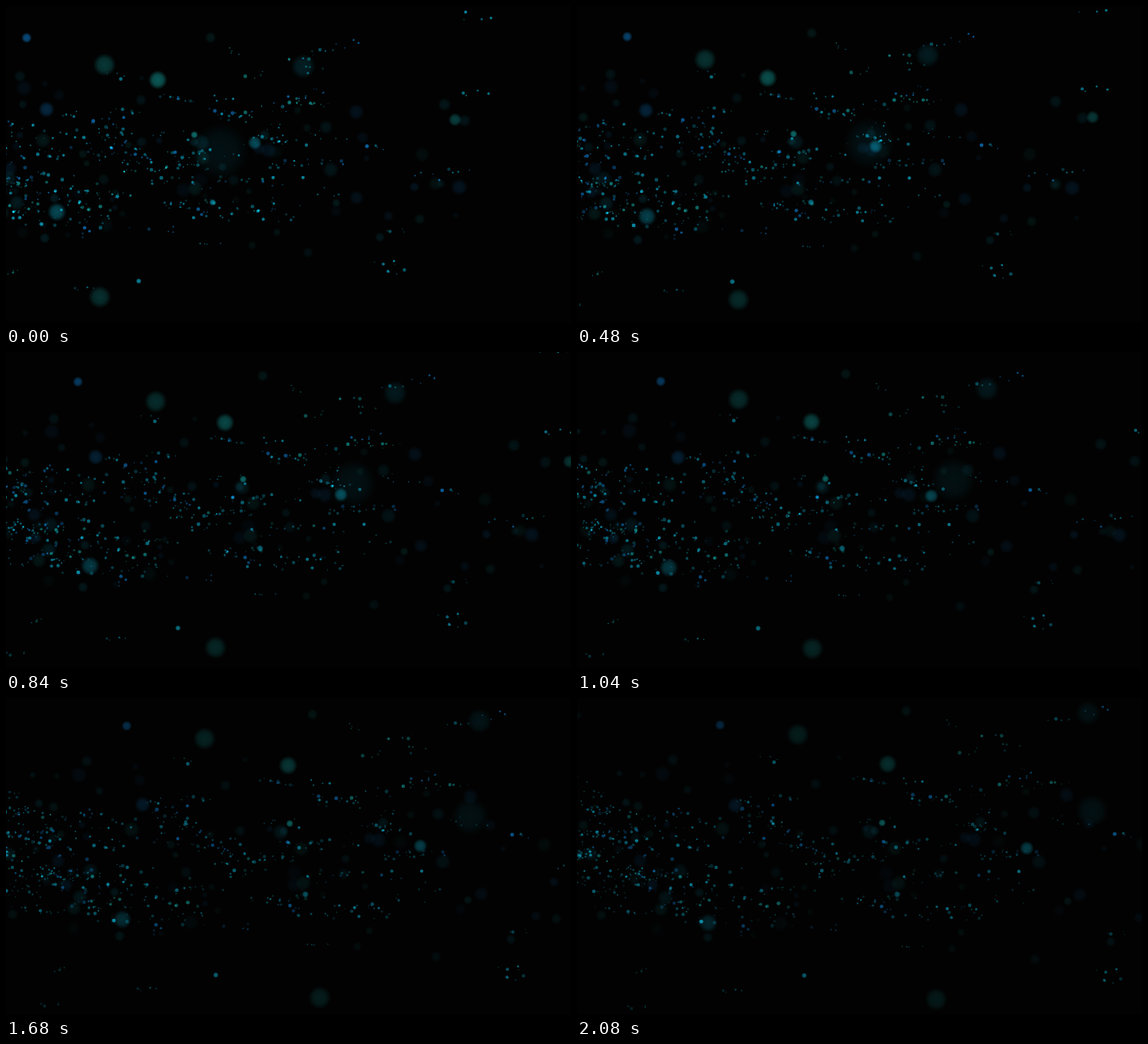
These frames come from a looping animation (711x400 px, 2.12 s). An HTML page with a canvas:

```html
<!DOCTYPE html>
<html lang="en">
<head>
<meta charset="utf-8">
<title>Drifting particles</title>
<style>
html, body { margin: 0; width: 100%; height: 100%; overflow: hidden; background: #000; }
canvas { display: block; }
</style>
</head>
<body>
<canvas width="711" height="400"></canvas>
<script>
const ctx = document.querySelector('canvas').getContext('2d');
const LOOP = 2120, STEP = 40, SPAN = 2080;
const TEAL = '14,135,132', CYAN = '8,145,172', BLUE = '10,105,175';

let seed = 29;
function rand() {
  seed = (seed + 0x6d2b79f5) | 0;
  let t = Math.imul(seed ^ (seed >>> 15), seed | 1);
  t ^= t + Math.imul(t ^ (t >>> 7), t | 61);
  return ((t ^ (t >>> 14)) >>> 0) / 4294967296;
}
const between = (a, b) => a + (b - a) * rand();
const bell = () => rand() + rand() + rand() - 1.5;
const pick = (...list) => list[Math.floor(rand() * list.length)];

const parts = [];
// dx, dy: travel over one loop; fade: share of opacity lost by its end
function add(color, x, y, dx, dy, r, a, fade = .5) {
  parts.push({ color, x, y, dx, dy, r, a, fade });
}

// The few discs that stand out
add(CYAN, 270, 183, 378, -41, 30, .1, 0);
add(TEAL, 124, 74, 154, -28, 12, .4);
add(TEAL, 191, 93, 200, -10, 10, .65);
add(TEAL, 118, 366, 334, 13, 12, .34);
add(TEAL, 237, 162, 147, -5, 4, .8, .2);
add(TEAL, 565, 143, 330, -12, 7, .45);
add(CYAN, 64, 259, 101, 24, 10, .48);
add(CYAN, 313, 172, 253, 17, 7.5, .5, .2);
add(CYAN, 260, 247, 143, 0, 3.6, .85, .4);
add(CYAN, 167, 346, 119, 3, 3, .9, .3);
add(CYAN, 374, 76, 269, -57, 13, .2);
add(BLUE, 26, 40, 154, -6, 5.5, .7);
add(BLUE, 51, 130, 148, 5, 8.5, .36);

// Parts further right are nearer, so they travel faster
const travel = x => 65 + Math.max(x, 0) * .22 + rand() * 65;
const lift = (y, dx) => (y - 205) * dx * .0009;

// A short loose row of dots that move together
function addRow(x, y, count, spread) {
  const dx = travel(x), color = pick(TEAL, CYAN, CYAN, BLUE), slope = between(-.08, .12);
  for (let i = 0; i < count; i++) {
    const off = between(-spread, spread);
    add(rand() < .7 ? color : CYAN, x + off, y + off * slope + bell() * 6, dx, lift(y, dx),
      .7 + 1.7 * rand() ** 2, between(.25, .9), between(.1, .6));
  }
}

// Dense stream on the left, then sparse outliers
for (let i = 0; i < 115; i++) addRow(-130 + 540 * rand() ** 1.3, 195 + bell() * 85, 6, 28);
for (let i = 0; i < 36; i++) addRow(between(-60, 600), between(10, 395), 4, 20);

// Out-of-focus dots
for (let i = 0; i < 90; i++) {
  const x = -90 + 670 * rand() ** 1.3, y = 195 + bell() * 125, dx = travel(x);
  add(pick(TEAL, CYAN, BLUE), x, y, dx, lift(y, dx), between(3, 9), between(.05, .18), .3);
}

function disc(x, y, r, a, color) {
  const soft = r > 2.6, edge = soft ? r * 1.2 : r;
  if (x < -edge || x > 711 + edge) return;
  ctx.fillStyle = `rgba(${color},${a})`;
  if (soft) {
    const g = ctx.createRadialGradient(x, y, 0, x, y, edge);
    g.addColorStop(0, `rgba(${color},${a})`);
    g.addColorStop(.55, `rgba(${color},${a * .8})`);
    g.addColorStop(1, `rgba(${color},0)`);
    ctx.fillStyle = g;
  }
  ctx.beginPath();
  ctx.arc(x, y, edge, 0, 7);
  ctx.fill();
}

function draw(t) {
  const u = t / SPAN;
  ctx.clearRect(0, 0, 711, 400);
  ctx.globalCompositeOperation = 'source-over';
  ctx.fillStyle = '#020202';
  ctx.fillRect(0, 0, 711, 398);
  ctx.globalCompositeOperation = 'lighter';
  for (const p of parts) {
    // Faster parts slow down more
    const way = u + p.dx / 2500 * u * (1 - u);
    const r = p.r > 20 ? p.r * (1 - .43 * u) : p.r;
    disc(p.x + p.dx * way, p.y + p.dy * way, r, p.a * (1 - p.fade * u), p.color);
  }
}

function frame() {
  draw(Math.floor(performance.now() % LOOP / STEP) * STEP);
  requestAnimationFrame(frame);
}
frame();
</script>
</body>
</html>
```
